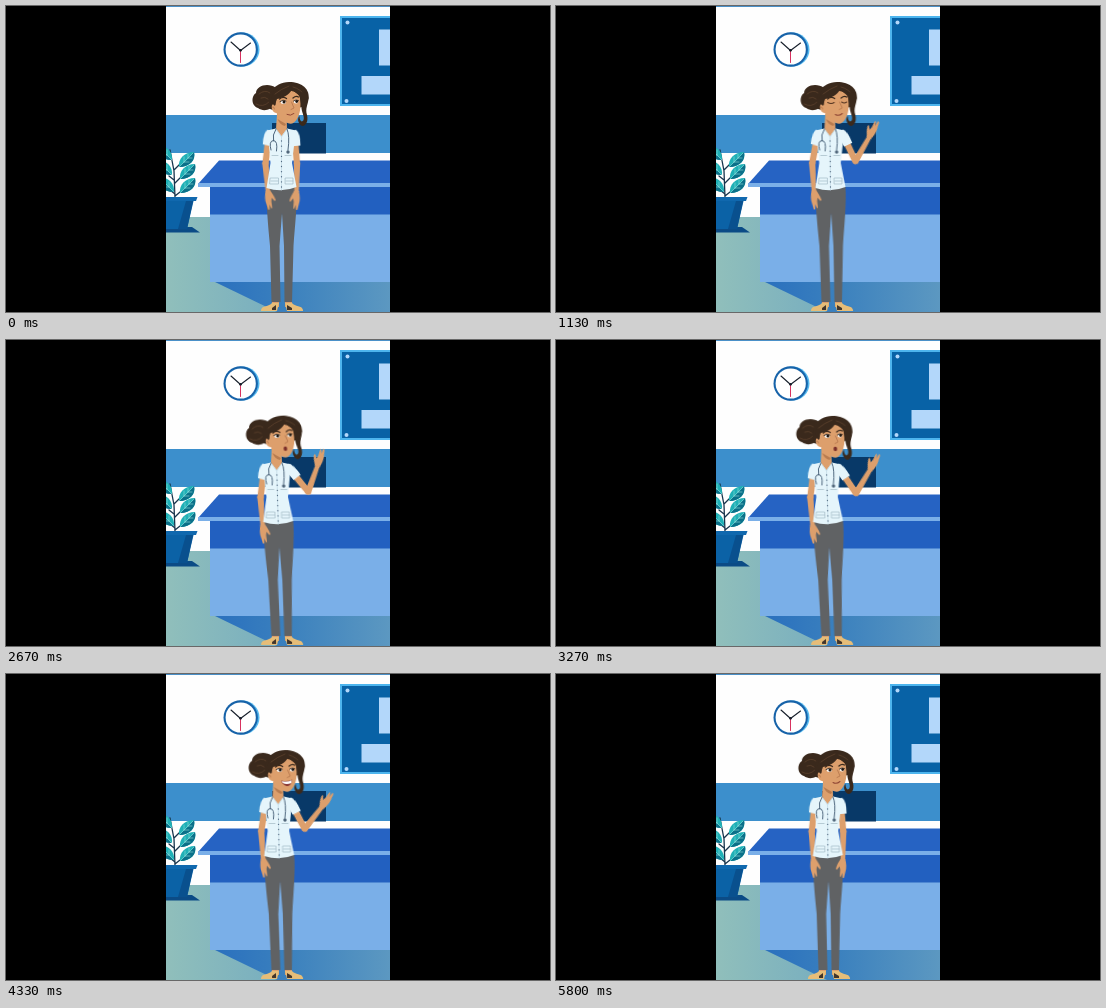
An HTML page without scripts for the animation above (5870 ms loop, 544 by 306 pixels).

```html
<!DOCTYPE html>
<html lang="en">
<head>
<meta charset="utf-8">
<title>Nurse at the reception desk</title>
<style>
html, body { margin: 0; width: 100%; height: 100%; overflow: hidden; background: #000; }
svg { display: block; width: 100vw; height: 100vh; }

.skin { fill: #dd9f6c; }
.cloth { fill: #e5f5fb; }
.hair { fill: #3a291c; }
.line { fill: none; stroke-linecap: round; stroke-linejoin: round; }

.lean, .nod, .armR, .foreR, .armL, .foreL, .palm {
  animation: 5870ms ease-in-out infinite;
}
.lean { animation-name: lean; }
.nod { animation-name: nod; }
.armR { animation-name: armR; }
.foreR { animation-name: foreR; }
.armL { animation-name: armL; }
.foreL { animation-name: foreL; }
.palm { animation-name: palm; }
.smile, .grin, .oh, .talk, .open, .half, .shut {
  opacity: 0;
  animation: 5870ms step-end infinite;
}
.smile { animation-name: smile; }
.grin { animation-name: grin; }
.oh { animation-name: oh; }
.talk { animation-name: talk; }
.open { animation-name: open; }
.half { animation-name: half; }
.shut { animation-name: shut; }

@keyframes lean {
  0%, 2% { transform: translateX(0) skewX(0deg); }
  19.25% { transform: translateX(0) skewX(.5deg); }
  30.66% { transform: translateX(0) skewX(2deg); }
  45.49% { transform: translateX(0) skewX(1.6deg); }
  65.93% { transform: translateX(0) skewX(1.75deg); }
  82.96%, 89% { transform: translateX(0) skewX(.3deg); }
  97%, 100% { transform: translateX(-3px) skewX(.3deg); }
}
@keyframes nod {
  0%, 19.25% { transform: rotate(0deg); }
  30.66% { transform: rotate(-1deg); }
  45.49% { transform: rotate(-2deg); }
  65.93% { transform: rotate(1deg); }
  82.96%, 100% { transform: rotate(0deg); }
}
@keyframes armR {
  0%, 2% { transform: rotate(-5deg); }
  11%, 19.25% { transform: rotate(-25deg); }
  30.66% { transform: rotate(-34deg); }
  45.49% { transform: rotate(-38deg); }
  65.93% { transform: rotate(-28deg); }
  82.96%, 89% { transform: rotate(-25deg); }
  97%, 100% { transform: rotate(-5deg); }
}
@keyframes foreR {
  0%, 2% { transform: rotate(6deg); }
  11%, 19.25% { transform: rotate(-125deg); }
  30.66% { transform: rotate(-95deg); }
  45.49% { transform: rotate(-121deg); }
  65.93% { transform: rotate(-109deg); }
  82.96%, 89% { transform: rotate(-122deg); }
  97%, 100% { transform: rotate(6deg); }
}
@keyframes palm {
  0%, 2% { transform: scaleX(-1); }
  11%, 89% { transform: scaleX(1); }
  97%, 100% { transform: scaleX(-1); }
}
@keyframes armL {
  0%, 2% { transform: rotate(7deg); }
  19.25%, 30.66% { transform: rotate(11deg); }
  45.49%, 65.93% { transform: rotate(9deg); }
  82.96%, 89% { transform: rotate(11deg); }
  97%, 100% { transform: rotate(7deg); }
}
@keyframes foreL {
  0%, 2% { transform: rotate(-12deg); }
  19.25% { transform: rotate(-14deg); }
  30.66% { transform: rotate(-4deg); }
  45.49%, 65.93% { transform: rotate(-12deg); }
  82.96%, 89% { transform: rotate(-14deg); }
  97%, 100% { transform: rotate(-10deg); }
}
@keyframes smile { 0%, 78% { opacity: 1; } 22% { opacity: 0; } }
@keyframes grin {
  28%, 40%, 50%, 60%, 71% { opacity: 1; }
  0%, 33%, 43%, 54%, 63%, 75%, 100% { opacity: 0; }
}
@keyframes oh {
  22%, 33%, 43%, 54%, 68% { opacity: 1; }
  0%, 25%, 36%, 47%, 57%, 71%, 100% { opacity: 0; }
}
@keyframes talk {
  25%, 36%, 47%, 57%, 63%, 75% { opacity: 1; }
  0%, 28%, 40%, 50%, 60%, 68%, 78%, 100% { opacity: 0; }
}
@keyframes open { 0%, 20.4%, 86% { opacity: 1; } 18.2%, 82% { opacity: 0; } }
@keyframes half { 0%, 84.2%, 100% { opacity: 0; } 82% { opacity: 1; } }
@keyframes shut { 0%, 20.4%, 86%, 100% { opacity: 0; } 18.2%, 84.2% { opacity: 1; } }
</style>
</head>
<body>
<svg viewBox="0 0 544 306" preserveAspectRatio="none">
  <defs>
    <linearGradient id="floor" gradientUnits="userSpaceOnUse" x1="160" x2="270">
      <stop offset="0" stop-color="#90bfbb"/>
      <stop offset="1" stop-color="#78aebf"/>
    </linearGradient>
    <linearGradient id="shade">
      <stop offset="0" stop-color="#2a70be"/>
      <stop offset=".4" stop-color="#3a80be"/>
      <stop offset="1" stop-color="#5c98c1"/>
    </linearGradient>
    <g id="leaf">
      <path fill="#1fb0b6" d="M0 0C-1-8 5-15 15-15C17-7 11 0 0 0Z"/>
      <path fill="#0b7089" d="M0 0C4-3 11-10 15-15C17-7 11 0 0 0Z"/>
      <path class="line" stroke="#8fdcda" stroke-width=".6" d="M0 0L14-14M5-5V-10M9-9V-13M5-5H10M9-9H13"/>
    </g>
    <path id="hand" class="skin" d="M-2.3-1C-3.5 4-3.8 8-2.6 12L-1.2 18L.2 18L.6 13L2 17L3 16.4L2.6 10L3.2 6.5L6 10L7 9C6.2 5 4 2 2.3-1Z"/>
    <path id="fore" class="skin" d="M-3.2-1Q0-5 3.2-1L2.2 28L-2.2 28Z"/>
    <path id="upper" class="skin" d="M-3.4 2L3.4 2L3.1 29Q0 33-3.1 29Z"/>
  </defs>

  <!-- room -->
  <rect x="160" width="224" height="306" fill="#fefefe"/>
  <rect x="160" width="224" height="1" fill="#4a90c8"/>
  <rect x="160" y="109" width="224" height="38" fill="#3c8fcc"/>
  <rect x="160" y="211" width="224" height="95" fill="url(#floor)"/>

  <!-- notice board -->
  <path fill="#4db5ee" d="M334 10H384V100H334Z"/>
  <path fill="#0862a6" d="M336 12H384V98H336Z"/>
  <g fill="#b3d7fa">
    <path d="M373 23.500H384V59.500H373ZM355.500 70H384V88.500H355.500Z"/>
    <circle cx="341.500" cy="16.500" r="2"/>
    <circle cx="340.500" cy="95" r="2"/>
  </g>

  <!-- clock -->
  <circle cx="236.500" cy="43.500" r="17" fill="#55b9ef"/>
  <circle cx="234.700" cy="43.500" r="17.200" fill="#1763a9"/>
  <circle cx="234.700" cy="43.500" r="15.100" fill="#fff"/>
  <path class="line" stroke="#d8325f" d="M234.500 44V56.500"/>
  <path class="line" stroke="#18202c" stroke-width="1.100" d="M225 36L234.500 44.500L244.500 37"/>
  <circle cx="234.500" cy="44.300" r="1.400" fill="#18202c"/>

  <!-- monitor and desk -->
  <path fill="#083968" d="M266 117H320V147.500H266Z"/>
  <path fill="#2663c3" d="M213 154.500H384V178H192Z"/>
  <path fill="#2260c0" d="M204 181H384V209H204Z"/>
  <path fill="#7aafe8" d="M192 177H384V181H192ZM204 208.500H384V276H204Z"/>
  <path fill="url(#shade)" d="M209 276H384V306H271Z"/>

  <!-- plant -->
  <path fill="#0b4b86" d="M160 221H186L194 226.500H160Z"/>
  <path class="line" stroke="#17334b" stroke-width="1.300" d="M169 192L168 165L164 144M169 190L174 186M169 177L174 172M168 164L173 159M169 188L164 184M168 174L163 170"/>
  <use href="#leaf" x="173" y="161"/>
  <use href="#leaf" x="174" y="173"/>
  <use href="#leaf" x="174" y="187"/>
  <use href="#leaf" transform="translate(166 154) scale(-1 1)"/>
  <use href="#leaf" transform="translate(166 169) scale(-1 1)"/>
  <use href="#leaf" transform="translate(168 186) scale(-1 1)"/>
  <path fill="#0b62a6" d="M160 193H188L181 223H160Z"/>
  <path fill="#09508e" d="M180 195H187L181 223H172Z"/>
  <path fill="#1068ae" d="M160 191H191.500L190 195H160Z"/>

  <!-- nurse -->
  <g transform="translate(276 300)"><g class="lean"><g transform="translate(-276 -300)">
    <path class="skin" d="M266 293H273V301H266ZM279 293H286V301H279Z"/>
    <path fill="#e6bd78" d="M255 304C256 299 263 301 266 297L273 297L271 305H255ZM297 304C296 299 289 301 286 297L279 297L281 305H297Z"/>
    <path fill="#41352b" d="M266 302L270 299L270 304H266ZM286 302L281 299L281 304H286Z"/>
    <path fill="#606264" d="M261 181H290.500C291.500 198 289 218 287.500 240L286 296H278.500L278 240L276 207L273.500 240L274.500 296H265.500L264 240C262 218 260 198 261 181Z"/>

    <g transform="translate(263 129)"><g class="armL">
      <use href="#upper"/>
      <g transform="translate(0 29)"><g class="foreL">
        <use href="#fore"/><use href="#hand" y="28"/>
      </g></g>
      <path class="cloth" d="M-2-5Q3-4 4 1L4 11L-5 10Q-6-2-2-5Z"/>
    </g></g>
    <g transform="translate(288.500 129)"><g class="armR">
      <use href="#upper"/>
      <g transform="translate(0 29)"><g class="foreR">
        <use href="#fore"/>
        <g transform="translate(0 28)"><g class="palm"><use href="#hand"/></g></g>
      </g></g>
      <path class="cloth" d="M2-5Q-3-4-4 1L-4 11L5 11Q6-2 2-5Z"/>
    </g></g>

    <path class="cloth" d="M261 124.500L270 122.500H281L290 124.500L288 140L286 157L290.500 181Q276 187 260.500 182L264.500 157L263 140Z"/>
    <path class="skin" d="M271 108H280.500L281 123L275.500 130L270 123Z"/>
    <path fill="#b87c50" d="M271.500 113L280 118L279 120Q274 119 271.500 113Z"/>
    <path class="line" stroke="#c3dbe6" stroke-width=".8" d="M270 123L275.500 131L281 123M275.500 131V184"/>
    <path class="line" stroke="#526a80" stroke-width="1.300" stroke-dasharray=".1 5" d="M275.500 135V182"/>
    <path class="line" stroke="#a3b9c5" stroke-width=".7" d="M264.500 172H272.500V178H264ZM279.500 172H287V178H279.500ZM265 175H272M280 175H287M266 149.500H272M279 149.500H285"/>
    <path class="line" stroke="#3d566f" stroke-width=".9" d="M270 123Q266 129 267.500 135M265 144Q262.500 135 267.500 134.500Q272 135 270.500 145M281 123Q284 130 282 144"/>
    <circle cx="282" cy="146" r="1.700" fill="#51677b"/>

    <g transform="translate(276 115)"><g class="nod"><g transform="translate(-276 -115)">
      <path class="hair" d="M270 82C262 76 250 80 250 87C245 90 245 100 252 102C257 106 265 104 269 99Z"/>
      <path class="line" stroke="#60442e" stroke-width=".7" d="M253 88Q259 83 264 87M250 98Q257 102 263 96M255 92Q259 90 262 93"/>
      <path class="hair" d="M264 103C260 90 267 76 283 76C296 76 304 83 302.500 93L297 101L270 105Z"/>
      <path class="skin" d="M270 92C276 83 289 82 294 91C295 101 294.500 107 291 113C288 118 284 119 280 116C276 114 272 111 270.500 107C266.500 107 264.500 101 266.500 98.500Q268 97.500 269.500 99.500Z"/>
      <path class="hair" d="M268.500 100C266 97 264 92 268 84C274 78 286 78 291 80C299 83 303 88 301 95C298 97 294 94 293.500 90C291 87 288 86 286 83.500C283 89 277 92 271 93Z"/>
      <path class="line" stroke="#60442e" stroke-width=".7" d="M269 88Q275 83 283 80M287 81Q295 83 299 90"/>
      <path class="hair" d="M293 87C297 85 303 87 302.500 93C302 99 299 102 301 109C303 117 298 122 294.500 119C291.500 116 291.500 112 293.500 110C293.500 115 296 117 297.500 114C299 110 295 106 295.500 100Z"/>
      <path class="line" stroke="#3a291c" stroke-width="1.300" d="M273.500 93Q277 90 280.500 92.500M287 92Q290 89.500 292.500 91"/>
      <path class="line" stroke="#b8794e" stroke-width=".9" d="M285.500 96L288 102L285 103.500M266.500 101Q268 100 268.500 103"/>

      <g class="open">
        <g fill="#fff"><ellipse cx="277.300" cy="96" rx="2.700" ry="1.900"/><ellipse cx="290" cy="95.500" rx="2.300" ry="1.900"/></g>
        <g fill="#20170f"><circle cx="278" cy="96" r="1.500"/><circle cx="290.700" cy="95.500" r="1.400"/></g>
        <path class="line" stroke="#2b1d13" stroke-width=".9" d="M274 95.500Q277 92.800 280 95M287.500 95Q290 92.800 292.500 94.500"/>
      </g>
      <g class="half">
        <path fill="#fff" d="M274 96H280.500Q278 100 274 96ZM287.500 95.500H292.500Q290.500 99 287.500 95.500Z"/>
        <path fill="#20170f" d="M276.500 96H279.500Q278 99.500 276.500 96ZM289.500 95.500H292Q291 98.500 289.500 95.500Z"/>
        <path class="line" stroke="#2b1d13" stroke-width=".9" d="M273.500 95.500L280.500 96.200M287.500 95.800L292.500 95"/>
      </g>
      <path class="line shut" stroke="#523320" stroke-width="1" d="M273.500 96.500Q277 98.500 280 96.500M287.500 96Q290 98 292.500 96"/>

      <path class="line smile" stroke="#914836" stroke-width="1" d="M281 108.500Q284.500 110.500 288 107.500"/>
      <g class="grin">
        <path fill="#842f2c" d="M279 106.500Q285 108 290 105.500Q289 112.500 284.500 112Q280 111 279 106.500Z"/>
        <path fill="#fff" d="M279.500 107Q285 108.500 289.500 106L289 109Q284 111 280.500 109Z"/>
      </g>
      <ellipse class="oh" cx="285" cy="109" rx="1.800" ry="2.300" fill="#792d29"/>
      <g class="talk">
        <path fill="#842f2c" d="M281 108Q285 106 289 107.500Q287 111.500 284 111Z"/>
        <path fill="#fff" d="M282 108Q285 106.800 288 107.800L287 109H283Z"/>
      </g>
    </g></g></g>
  </g></g></g>

  <path d="M0 0H160V306H0ZM384 0H544V306H384Z"/>
</svg>
</body>
</html>
```
